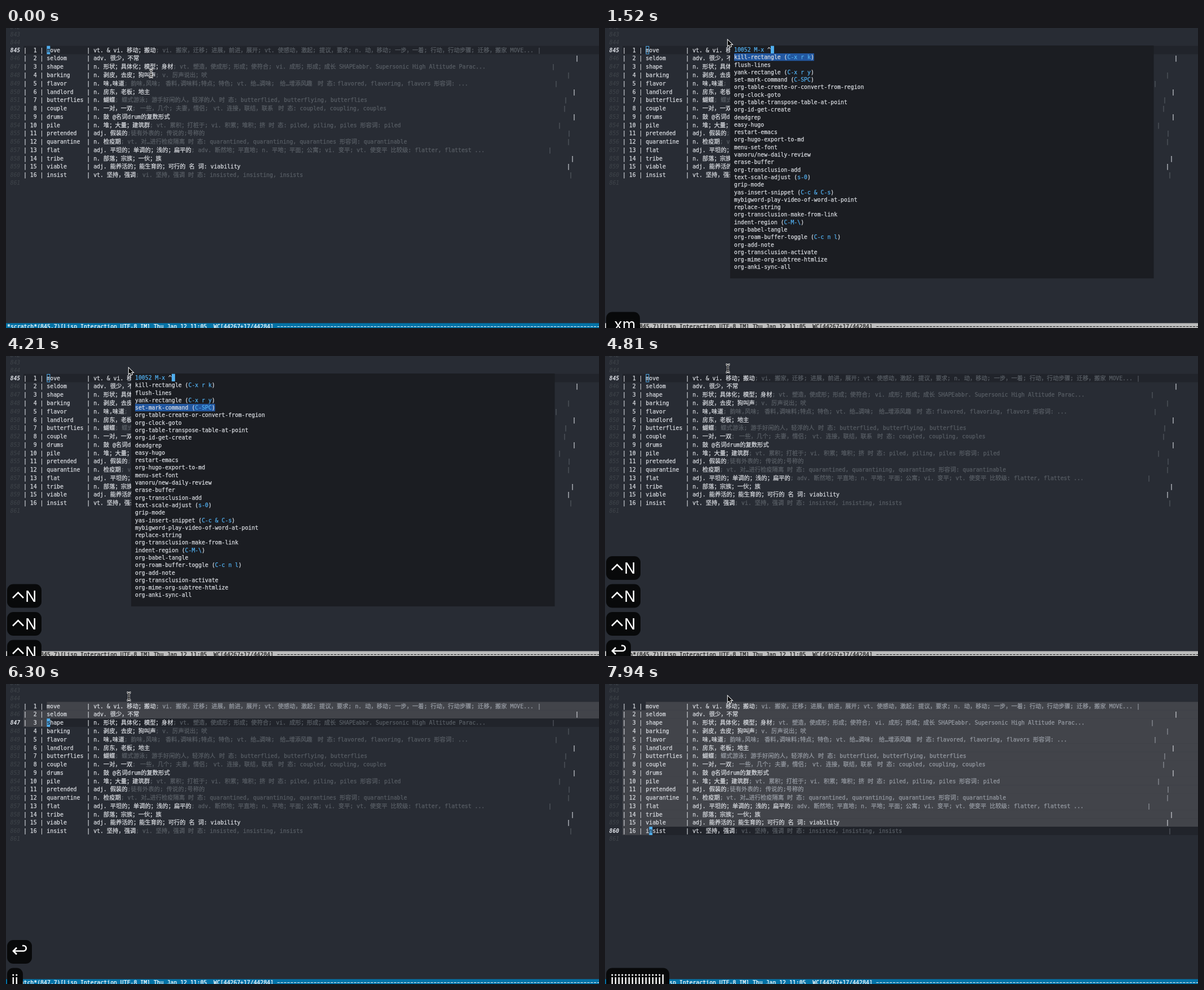
Animation, 1052 px wide and 532 px high, one loop 8000 ms. Source, as an HTML page with a canvas:

```html
<!DOCTYPE html>
<html lang="zh-CN">
<meta charset="utf-8">
<style>
html, body { margin: 0; overflow: hidden; background: #282c34; }
canvas { display: block; }
</style>
<canvas id="stage" width="1052" height="532"></canvas>
<script>
const ctx = document.getElementById('stage').getContext('2d');
const MONO = '9.82px "DejaVu Sans Mono", monospace';
const CJK = '10.3px "Noto Sans CJK SC", "Noto Sans CJK", sans-serif';
const KEY = '27px Inter, sans-serif';
const CELL = 5.912, LEFT = 31, TOP = 31.7, ROW = 14.76, LINE = 13.29;
const BG = '#282c34', CURRENT = '#21242b', REGION = '#42444a', BLUE = '#51afef';
const FG = '#d8dbe0', DIM = '#585e65', DIM_REGION = '#969ba3';

// word / definition / x of the closing bar; {n} jumps to x = n
const words = `move/vt. & vi. 移动；搬动; vi. 搬家，迁移; 进展，前进，展开; vt. 使感动，激起; 提议，要求; n. 动，移动; 一步，一着; 行动，行动步骤; 迁移，搬家 MOVE.../946
seldom/adv. 很少，不常/1013
shape/n. 形状；具体化；模型；身材; vt. 塑造，使成形；形成；使符合; {479}vi. 成形；形成；成长 SHAPEabbr. Supersonic High Altitude Parac.../971
barking/n. 剥皮，去皮；狗叫声; v. 厉声说出；吠/998
flavor/n. 味,味道; 韵味,风味; {283}香料,调味料; {346}特点；特色; {410}vt. 给…调味; {486}给…增添风趣 {553}时 态: {588}flavored, flavoring, flavors 形容词: .../976
landlord/n. 房东，老板；地主/1008
butterflies/n. 蝴蝶; 蝶式游泳; 游手好闲的人，轻浮的人 {378}时 态: butterflied, butterflying, butterflies/993
couple/n. 一对，一双; {238}一些，几个; 夫妻，情侣; {368}vt. 连接，联结，联系 {483}时 态: coupled, coupling, couples/991
drums/n. 鼓 @名词drum的复数形式/1008
pile/n. 堆；大量；建筑群; vt. 累积；打桩于; vi. 积累；堆积；挤 时 态: piled, piling, piles 形容词: piled/982
pretended/adj. 假装的;徒有外表的; 传说的;号称的/999
quarantine/n. 检疫期; vt. 对…进行检疫隔离 时 态: quarantined, quarantining, quarantines 形容词: quarantinable/998
flat/adj. 平坦的；单调的；浅的；扁平的; adv. 断然地；平直地; n. 平地；平面；公寓; vi. 变平; vt. 使变平 比较级: flatter, flattest .../965
tribe/n. 部落；宗族；一伙；族/1005
viable/adj. 能养活的；能生育的；可行的 名 词: viability/998
insist/vt. 坚持，强调; vi. 坚持，强调 时 态: insisted, insisting, insists/1002`
  .split('\n').map(line => line.split('/'));

const commands = `kill-rectangle (C-x r k)
flush-lines
yank-rectangle (C-x r y)
set-mark-command (C-SPC)
org-table-create-or-convert-from-region
org-clock-goto
org-table-transpose-table-at-point
org-id-get-create
deadgrep
easy-hugo
restart-emacs
org-hugo-export-to-md
menu-set-font
vanoru/new-daily-review
erase-buffer
org-transclusion-add
text-scale-adjust (s-0)
grip-mode
yas-insert-snippet (C-c & C-s)
mybigword-play-video-of-word-at-point
replace-string
org-transclusion-make-from-link
indent-region (C-M-\\)
org-babel-tangle
org-roam-buffer-toggle (C-c n l)
org-add-note
org-transclusion-activate
org-mime-org-subtree-htmlize
org-anki-sync-all`.split('\n');

// Key bezels: shown from start, half faded at fade, gone 150 ms later
const keys = [
  { label: 'xm', width: 60, start: 1370, fade: 3320 },
  { label: '^N', width: 61, start: 3470, fade: 5410 },
  { label: '^N', width: 61, start: 3760, fade: 5710 },
  { label: '^N', width: 61, start: 4210, fade: 6150 },
  { label: 'enter', width: 44, start: 4810, fade: 6900 },
  { label: 'j', start: 5860, fade: 9000 },
];
const moves = [[5860, 1], [6300, 2], [6450, 3], [6600, 5], [6750, 7], [6900, 9],
  [7050, 11], [7200, 13], [7340, 14], [7790, 15]];
const blinks = [[330, 770], [1220, 1370], [5410, 5860]];

function rect(x, y, w, h, color) {
  ctx.fillStyle = color;
  ctx.fillRect(x, y, w, h);
}

// Draws mixed Latin and Chinese text in a medium weight, returns the end x
function text(str, x, y, color) {
  ctx.fillStyle = ctx.strokeStyle = color;
  ctx.lineWidth = .25;
  for (const [part, jump] of str.matchAll(/\{(\d+)\}|[ -z|…]+|[^ -z|{…]+/g)) {
    if (jump) { x = +jump; continue; }
    ctx.font = /[ -z|…]/.test(part[0]) ? MONO : CJK;
    ctx.fillText(part, x, y);
    ctx.strokeText(part, x, y);
    x += ctx.measureText(part).width;
  }
  return x;
}

function lineNumber(n, y, active) {
  ctx.font = (active ? 'italic bold ' : 'italic ') + MONO;
  ctx.fillStyle = active ? '#dfe2e8' : '#3f444a';
  ctx.fillText(n, 7.5, y);
}

function drawBuffer(t, row, col, focused) {
  for (let i = 0; i < 3; i++) lineNumber(842 + i, TOP - 3.1 - LINE * (2 - i), false);
  lineNumber(861, TOP + ROW * 16 + 10.3, false);
  const cursorX = LEFT + col * CELL;
  words.forEach(([word, meaning, bar], i) => {
    const top = TOP + i * ROW, base = top + 11;
    const inRegion = i < row;
    if (i === row) rect(LEFT, top, 1052, ROW, CURRENT);
    if (inRegion) {
      const x = i ? LEFT : LEFT + 7 * CELL;
      rect(x, top, 1052 - x, ROW + .3, REGION);
    } else if (i === row && row) rect(LEFT, top, cursorX - LEFT, ROW, REGION);
    lineNumber(845 + i, base, i === row);
    text(`| ${String(i + 1).padStart(2)} | ${word.padEnd(11)} |`, LEFT, base, FG);
    const cut = (meaning + ';').indexOf(';');
    const dim = inRegion ? DIM_REGION : DIM;
    const x = text(meaning.slice(0, cut), LEFT + 21 * CELL, base, FG);
    text(meaning.slice(cut), x, base, dim);
    text('|', bar - CELL / 2, base, cut < meaning.length ? dim : FG);
  });
  const top = TOP + row * ROW;
  if (!focused) {
    ctx.strokeStyle = BLUE;
    ctx.lineWidth = 1;
    ctx.strokeRect(cursorX + .5, top + .8, CELL - 1, ROW - 1.3);
  } else if (!blinks.some(([from, to]) => t >= from && t < to)) {
    rect(cursorX, top, CELL, ROW, BLUE);
    text(words[row][0][col - 7], cursorX, top + 11, CURRENT);
  }
}

function drawModeline(row, col, focused) {
  const color = focused ? '#fff' : '#1b1b1b';
  rect(0, 523.4, 1052, 9, focused ? '#0372a6' : '#bcbcbc');
  const end = text(`*scratch*(${845 + row},${col})[Lisp Interaction UTF-8 IM] ` +
    'Thu Jan 12 11:05  WC[44267+17/44284] ', 2, 533, color);
  ctx.beginPath();
  ctx.moveTo(end + .9, 529.5);
  ctx.lineTo(1052, 529.5);
  ctx.setLineDash([4.1, CELL - 4.1]);
  ctx.lineWidth = 1;
  ctx.stroke();
  ctx.setLineDash([]);
}

function drawPopup(selected) {
  rect(222, 31, 751.5, 413, '#1b1d22');
  const x = text('10052 M-x ', 229, 42, BLUE);
  rect(text('^', x, 42, FG), 31.7, CELL, LINE, BLUE);
  commands.forEach((command, i) => {
    const top = TOP + (i + 1) * LINE, base = top + 10.3;
    if (i === selected) rect(229, top, command.length * CELL, LINE, '#2257a0');
    const [name, key] = command.split('(');
    const end = text(name, 229, base, FG);
    if (key) text(')', text(key.slice(0, -1), text('(', end, base, FG), base, BLUE), base, FG);
  });
}

function stroke(path, color, width) {
  ctx.strokeStyle = color;
  ctx.lineWidth = width;
  ctx.stroke(path);
}

const ibeam = new Path2D('M-3.5 -7Q0 -7 0 -4V4Q0 7 -3.5 7M3.5 -7Q0 -7 0 -4V4Q0 7 3.5 7M-2 2H2');
const arrow = new Path2D('M0 0V10.5L2.4 8.3L4.2 12.2L6 11.4L4.3 7.6H7.6Z');
const chevron = new Path2D('M10 24.5L19.5 15L29 24.5');
const hook = new Path2D('M27 10H29A4.7 4.7 0 0 1 29 19.5H11.5M17 13.5L11 19.5L17 25.5');

function drawMouse(x, y, pointer) {
  ctx.save();
  ctx.translate(x, y);
  if (pointer) {
    stroke(arrow, '#fff', 2);
    ctx.fillStyle = '#000';
    ctx.fill(arrow);
  } else {
    stroke(ibeam, '#fff', 3);
    stroke(ibeam, '#000', 1);
  }
  ctx.restore();
}

function drawKeys(t, typed) {
  const shown = keys.filter(k => t >= k.start).reverse();
  shown.forEach(({ label, width, fade }, slot) => {
    if (t >= fade + 145) return;
    ctx.save();
    ctx.globalAlpha = t >= fade ? .55 : 1;
    ctx.translate(2, 503.5 - slot * 49.5);
    ctx.beginPath();
    ctx.roundRect(0, 0, width || 16 + typed.length * 6, 42, 11);
    ctx.fillStyle = '#08090a';
    ctx.fill();
    ctx.fillStyle = '#fff';
    ctx.font = KEY;
    if (label === 'xm') ctx.fillText('xm', 14, 31);
    else if (label === '^N') {
      stroke(chevron, '#fff', 2.6);
      ctx.fillText('N', 32, 31);
    } else if (label === 'enter') stroke(hook, '#fff', 2.7);
    else {
      ctx.textAlign = 'center';
      [...typed].forEach((c, i) => ctx.fillText(c, 10.7 + i * 6, 31));
    }
    ctx.restore();
  });
}

function draw(t) {
  const row = moves.reduce((r, [at, n]) => t >= at ? n : r, 0);
  const right = t >= 7940;
  const col = right ? 8 : 7;
  const popup = t >= 1520 && t < 4810;
  const focused = t < 1520 || t >= 4960;
  rect(0, 0, 1052, 532, BG);
  drawBuffer(t, row, col, focused);
  drawModeline(row, col, focused);
  if (popup) drawPopup([3470, 3760, 4210].filter(at => t >= at).length);
  if (popup || t >= 6450) drawMouse(217.8, 21.3, true);
  else if (t < 1520) drawMouse(257.5, 80.5, false);
  else drawMouse(218, 22, false);
  drawKeys(t, 'j'.repeat(row) + (right ? 'l' : ''));
}

function tick() {
  draw(performance.now() % 8000);
  requestAnimationFrame(tick);
}
tick();
</script>
</html>
```
